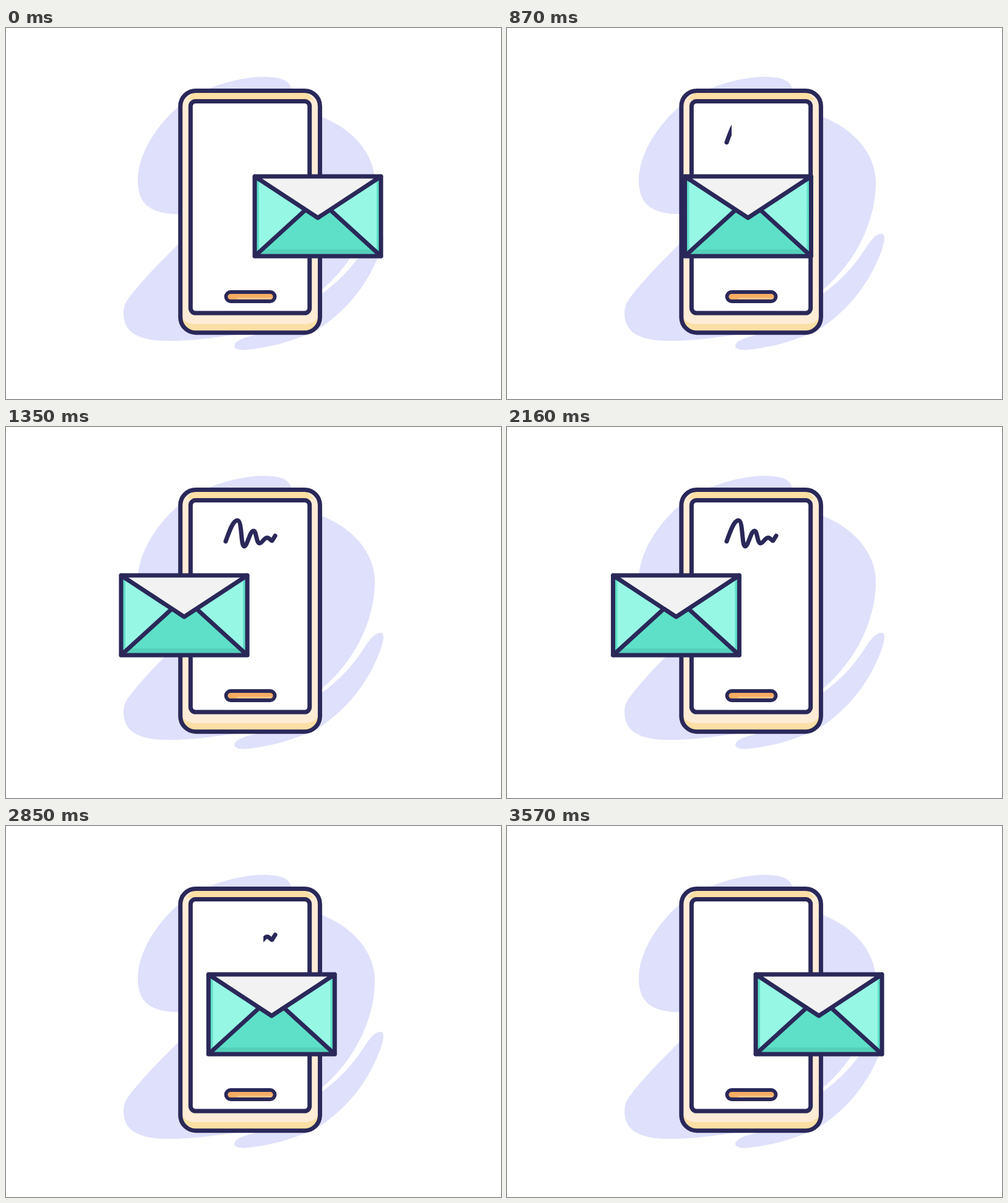
Recreate the animation shown at these times as an HTML page. Size 800x600 px, loop 3600 ms.

```html
<!DOCTYPE html>
<html lang="en">
<head>
<meta charset="utf-8">
<title>Mail on phone</title>
<style>
  html, body { margin: 0; width: 100%; height: 100%; overflow: hidden; background: #fff; }
  svg { display: block; width: 100vw; height: 100vh; }
  .line { stroke: #2a2859; stroke-width: 7; stroke-linejoin: round; stroke-linecap: round; }
</style>
</head>
<body>
<svg viewBox="0 0 800 600" fill="none">
  <defs>
    <clipPath id="wipe"><rect id="window" y="130" height="80"/></clipPath>
  </defs>

  <g fill="#dfe0fb">
    <path d="M461 99C458 82 438 79 415 79C370 80 315 97 279 127C240 160 213 207 213 247C213 283 232 301 279 301H400V99Z"/>
    <path d="M500 140C552 157 596 198 596 250C596 314 562 384 500 432Z"/>
    <path d="M290 339L278 350C250 378 220 408 199 436C192 445 190 452 190 462C190 492 214 506 262 506C310 506 345 499 400 492V339Z"/>
    <path d="M500 437C535 414 560 387 579 357C590 339 600 331 607 333C612 335 610 347 605 361C586 412 555 452 511 483C476 504 430 516 392 520C377 522 369 519 369 514C370 505 386 500 410 495L470 450Z"/>
  </g>

  <rect x="282" y="101.5" width="225" height="391" rx="25" fill="#ffecd6"/>
  <path fill="#fbdfa4" d="M303 104H486L497 116H292ZM282 460C284 473 294 479 307 479H482C495 479 505 473 507 460V468Q507 492.5 482 492.5H307Q282 492.5 282 468Z"/>
  <rect class="line" x="281.8" y="101.5" width="225.6" height="391.2" rx="25"/>
  <rect class="line" x="298.3" y="118.5" width="192.4" height="342.5" rx="8" fill="#fff"/>
  <rect x="355.5" y="427" width="79" height="15" rx="7.5" fill="#f7ad63"/>
  <path d="M374 436H433V440H374Z" fill="#fbc488"/>
  <rect class="line" x="355.5" y="427" width="79" height="15" rx="7.5" style="stroke-width:5.8"/>

  <g clip-path="url(#wipe)">
    <path class="line" d="M355 185C361 168 367 151 374 151C382 151 379 193 385 193C390 193 394 168 400 168C405 168 404 188 410 188C414 188 417 179 422 179C426 179 427 184 430 184L435 176"/>
  </g>

  <g id="mail">
    <path fill="#97f7e5" d="M-102 240H102V369H-102Z"/>
    <path fill="#5ee0c8" d="M-102 240H-95V369H-102ZM95 240H102V369H95ZM-102 369L-22 296L0 307L22 296L102 369Z"/>
    <path fill="#55d0bb" d="M-90 358H90L98 366H-98Z"/>
    <path fill="#f2f2f2" d="M-102 240H102L0 307Z"/>
    <path class="line" d="M-102 240H102V369H-102ZL0 307L102 240M-102 369L-22 296M102 369L22 296"/>
  </g>
</svg>
<script>
const LOOP = 3600, RIGHT = 504, LEFT = 288, PULL = 28.5;
const mail = document.getElementById('mail');
const wipe = document.getElementById('window');

// Eased progress between two times: cubic-bezier(.367, 0, .356, 1)
function ease(t, start, end) {
  const x = Math.min(1, Math.max(0, (t - start) / (end - start)));
  let lo = 0, hi = 1;
  for (let i = 0; i < 24; i++) {
    const s = (lo + hi) / 2, r = 1 - s;
    if (1.101 * s * r * r + 1.068 * s * s * r + s ** 3 < x) lo = s; else hi = s;
  }
  return x === 0 || x === 1 ? x : lo * lo * (3 - 2 * lo);
}

function draw(now) {
  const t = now % LOOP, travel = RIGHT - LEFT + PULL;
  const x = RIGHT
    + PULL * ease(t, 0, 510) - travel * ease(t, 516, 1323)
    - PULL * ease(t, 1980, 2430) + travel * ease(t, 2435, 3260);
  mail.setAttribute('transform', `translate(${x.toFixed(2)})`);

  const from = 349 + 91 * ease(t, 2707, 2977);
  const to = 349 + 91 * ease(t, 812, 1082);
  wipe.setAttribute('x', from);
  wipe.setAttribute('width', Math.max(0, to - from));
}

const begin = performance.now();
function tick() {
  draw(performance.now() - begin);
  requestAnimationFrame(tick);
}
tick();
</script>
</body>
</html>
```
